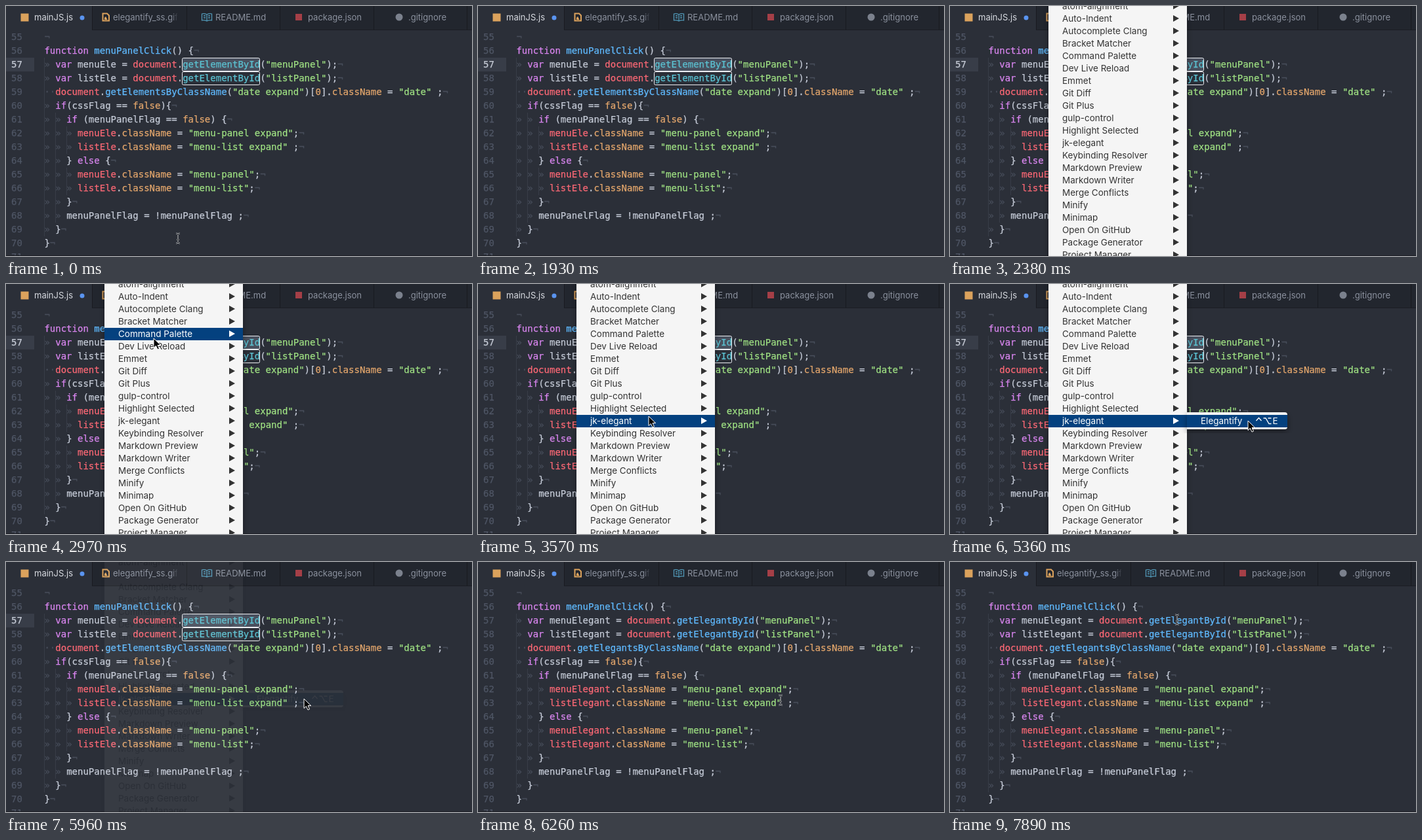
These frames come from a looping animation (710 px wide and 382 px high, 8000 ms). An HTML page:

```html
<!DOCTYPE html>
<html lang="en">
<head>
<meta charset="utf-8">
<title>Editor menu</title>
<style>
  html, body { margin: 0; width: 100%; height: 100%; overflow: hidden; background: #2b2f38; }
  svg { display: block; width: 710px; height: 382px; }
  text { white-space: pre; }
  .code text { font: 14px "DejaVu Sans Mono", "Liberation Mono", monospace; color: #c5cbd7; }
  .code text, .code tspan { fill: currentColor; stroke: currentColor; stroke-width: .25px; }
  .code .num { color: #4f5665; }
  .code .num.now { color: #c8cdd8; }
  .dim { color: #474d5a; }
  .key { color: #d885ee; }
  .fn { color: #5fb9fd; }
  .dom { color: #5bc2d2; }
  .obj { color: #fc6875; }
  .str { color: #9fe183; }
  .val { color: #e3a66c; }
  .tab { font: 13px Inter, Roboto, sans-serif; fill: #8b919e; }
  .tab.on { fill: #d7dae0; }
  .menu text { font: 13.5px Inter, Roboto, sans-serif; fill: #333; }
  .menu path { fill: #333; }
  .menu .on text { fill: #fff; }
  .menu .on path { fill: #fff; }
  .menu .keys { fill: none; stroke: #333; stroke-width: 1.3; }
  .menu .on .keys { fill: none; stroke: #fff; }
</style>
</head>
<body>
<svg viewBox="0 0 710 382">
  <defs>
    <linearGradient id="fade"><stop offset="0" stop-color="#22262e" stop-opacity="0"/><stop offset="1" stop-color="#22262e"/></linearGradient>
    <filter id="shade" x="-20%" y="-20%" width="140%" height="140%">
      <feDropShadow dx="0" dy="4" stdDeviation="5" flood-opacity=".4"/>
    </filter>
  </defs>
  <rect width="710" height="382" fill="#2b2f38"/>
  <g id="tabs"></g>
  <g id="before" class="code"></g>
  <g id="after" class="code"></g>
  <rect y="381" width="710" height="1" fill="#1e2027"/>
  <g id="menu" class="menu"></g>
  <g id="arrow">
    <path d="M0 0V14.5L3.4 11.4L6 17L8.5 15.9L6 10.5H10.6Z" fill="#000" stroke="#fff" stroke-linejoin="round"/>
  </g>
  <g id="beam" fill="none">
    <path d="M-3-7.5Q0-7.5 0-5.5Q0-7.5 3-7.5M0-5.5V5.5M-3 7.5Q0 7.5 0 5.5Q0 7.5 3 7.5M-2 2H2" stroke="#e4e6ea" stroke-width="2" stroke-opacity=".85"/>
    <path d="M-3-7.5Q0-7.5 0-5.5Q0-7.5 3-7.5M0-5.5V5.5M-3 7.5Q0 7.5 0 5.5Q0 7.5 3 7.5M-2 2H2" stroke="#15171c" stroke-width=".9"/>
  </g>
</svg>
<script>
const $ = id => document.getElementById(id);
const LOOP = 8000, LEFT = 58.4, CHAR = 8.428, LINE = 21, FIRST = 55;
const rect = (x, y, w, h, fill, more = "") =>
  `<rect x="${x}" y="${y}" width="${w}" height="${h}" fill="${fill}" ${more}/>`;
const text = (x, y, s, cls = "") => `<text x="${x}" y="${y}" class="${cls}">${s}</text>`;

// Tabs
const tabNames = [[43, "mainJS.js"], [163, "elegantify_ss.gif"], [319, "README.md"], [460, "package.json"], [613, ".gitignore"]];
$("tabs").innerHTML =
  rect(0, 0, 710, 37, "#22262e") + rect(0, 0, 131, 37, "#2b2f38") +
  [131, 275, 417, 560, 702].map(x => rect(x, 0, 1, 37, "#191b20")).join("") +
  rect(131, 36, 579, 1, "#1b1d23") +
  tabNames.map(([x, s], i) => text(x, 22, s, i ? "tab" : "tab on")).join("") +
  rect(252, 8, 10, 22, "url(#fade)") + rect(261, 8, 12, 22, "#22262e") +
  `<circle cx="116" cy="18" r="3.5" fill="#5a94f0"/>` +
  rect(22.5, 11.5, 12, 12, "#dba25c") +
  `<path d="M147.5 22.5V11.5H154L157 14.5V22.5Z" fill="none" stroke="#dba25c" stroke-width="2"/>
   <path d="M150 21V18L152 16L154.5 21Z" fill="#dba25c"/>
   <path d="M306 13Q302 11 298.5 12V22Q302 21 306 23Q310 21 313.5 22V12Q310 11 306 13V23M301 15H304M301 18H304M308 15H311M308 18H311" fill="none" stroke="#5199b8" stroke-width="1.3"/>` +
  rect(441, 12, 10, 10, "#a53f47") +
  `<circle cx="599" cy="17" r="5.5" fill="#7b818d"/>`;

// Code
const source = `
function menuPanelClick() {
» var menuEle = document.getElementById("menuPanel");
» var listEle = document.getElementById("listPanel");
··document.getElementsByClassName("date expand")[0].className = "date" ;
» if(cssFlag == false){
» » if (menuPanelFlag == false) {
» » » menuEle.className = "menu-panel expand";
» » » listEle.className = "menu-list expand" ;
» » } else {
» » » menuEle.className = "menu-panel";
» » » listEle.className = "menu-list";
» » }
» » menuPanelFlag = !menuPanelFlag ;
» }
}`;

function style(word, next) {
  if (/^[»·¬]/.test(word)) return "dim";
  if (word[0] === '"') return "str";
  if (/^(function|var|if|else)$/.test(word)) return "key";
  if (/^(false|0|className)$/.test(word)) return "val";
  if (word === "getElementById") return "dom";
  if (/^(get\w+|menuPanelClick)$/.test(word)) return "fn";
  return /^[a-z]/i.test(word) && next === "." ? "obj" : "";
}

function paint(line) {
  return line.replace(/"[^"]*"|\w+|[»·¬]+/g, (word, at) => {
    const cls = style(word, line[at + word.length]);
    return cls ? `<tspan class="${cls}">${word}</tspan>` : word;
  });
}

function codeView(src, picked) {
  let out = "";
  if (picked) {
    const x = Math.round(LEFT + 25 * CHAR) - .5, w = 14 * CHAR;
    out += rect(0, 79, 43, 21, "#383d48") +
      rect(x, 79.5, w, 20, "#49505e", 'rx="2" stroke="#eceef2"') +
      rect(x, 100.5, w, 20, "none", 'rx="2" stroke="#eceef2"');
  }
  src.split("\n").forEach((line, i) => {
    const y = 52 + i * LINE, depth = (line.match(/»|··/g) || []).length;
    for (let d = 0; d < depth; d++)
      out += rect(Math.round(LEFT + d * 2 * CHAR), y - 15, 1, LINE, "#383d48");
    out += text(8, y, FIRST + i, picked && i === 2 ? "num now" : "num") + text(LEFT, y, paint(line + "¬"));
  });
  return out + text(8, 52 + 16 * LINE, "71", "num");
}
$("before").innerHTML = codeView(source, true);
$("after").innerHTML = codeView(source.replace(/Element|Ele\b/g, "Elegant"), false);

// Menu
const ROW = 19;
const items = ["atom-alignment", "Auto-Indent", "Autocomplete Clang", "Bracket Matcher", "Command Palette",
  "Dev Live Reload", "Emmet", "Git Diff", "Git Plus", "gulp-control", "Highlight Selected", "jk-elegant",
  "Keybinding Resolver", "Markdown Preview", "Markdown Writer", "Merge Conflicts", "Minify", "Minimap",
  "Open On GitHub", "Package Generator", "Project Manager"];
const BLUE = "#04417f";
$("menu").innerHTML =
  rect(150, -20, 211, 420, "#f5f5f5", 'filter="url(#shade)"') +
  rect(150, 0, 211, ROW, BLUE, 'id="bar"') +
  items.map((s, i) => `<g class="item">${text(171, i * ROW + 5, s)}<path d="M340 ${i * ROW - 5}L349 ${i * ROW}L340 ${i * ROW + 5}Z"/></g>`).join("") +
  `<g id="sub"><path d="M361 196H510Q514 196 514 200V218Q514 222 510 222H361Z" style="fill:#f5f5f5" filter="url(#shade)"/>` +
  rect(361, 200, 153, ROW, BLUE, 'id="subBar"') +
  text(382, 214, "Elegantify") + text(491.5, 214, "E") +
  `<path class="keys" d="M466.5 209L470.5 204.5L474.5 209M477.5 205H481L486 213.5H489.5M484.5 205H489.5"/></g>`;
const rows = [...document.querySelectorAll(".item")];

// Pointer stops: kind, start, end, points spread evenly between them
const moves = [
  ["beam", 0, 0, [[262, 355]]],
  ["beam", 150, 1190, [[260, 347], [253, 322], [240, 284], [222, 238], [203, 194], [186, 159], [173, 135], [167, 125]]],
  ["beam", 1340, 1640, [[162, 114], [148, 83], [130, 48]]],
  ["arrow", 1780, 1780, [[97, 4]]],
  ["", 1930, 1930, [[97, -30]]],
  ["arrow", 2680, 3720, [[196, 5], [209, 42], [225, 83], [238, 124], [248, 160], [255, 186], [260, 202], [260, 209]]],
  ["arrow", 3870, 4910, [[263, 209], [280, 209], [309, 208], [344, 208], [381, 207], [416, 207], [439, 207], [448, 207]]],
  ["arrow", 5060, 5360, [[454, 208], [454, 208], [454, 209]]],
  ["beam", 6260, 6260, [[461, 211]]],
  ["beam", 7010, 7890, [[456, 205], [441, 188], [417, 161], [390, 131], [367, 108], [352, 94], [346, 88]]]
];
const stops = moves.flatMap(([kind, from, to, pts]) => pts.map(([x, y], i) => {
  const t = from + (to - from) * i / Math.max(1, pts.length - 1);
  return { t: Math.floor(t / 10) * 10, kind, x, y };
}));

const show = (el, on) => el.style.display = on ? "" : "none";

function draw(t) {
  const at = stops.filter(s => s.t <= t).pop();
  for (const kind of ["arrow", "beam"]) {
    show($(kind), at.kind === kind);
    $(kind).setAttribute("transform", `translate(${at.x} ${at.y})`);
  }
  show($("before"), t < 6260);
  show($("after"), t >= 6260);

  show($("menu"), t >= 2380 && t < 6110);
  $("menu").style.opacity = t >= 5960 ? .06 : 1;
  const hot = at.y < 0 ? -1 : Math.round(at.y / ROW);
  rows.forEach((row, i) => row.classList.toggle("on", i === hot));
  show($("bar"), hot >= 0);
  $("bar").setAttribute("y", hot * ROW - 9);
  show($("sub"), t >= 3870);
  const picked = at.x > 361 && !(t >= 5810 && t < 5960);
  show($("subBar"), picked);
  $("sub").classList.toggle("on", picked);
}

const start = performance.now();
function tick() {
  draw((performance.now() - start) % LOOP);
  requestAnimationFrame(tick);
}
tick();
</script>
</body>
</html>
```
